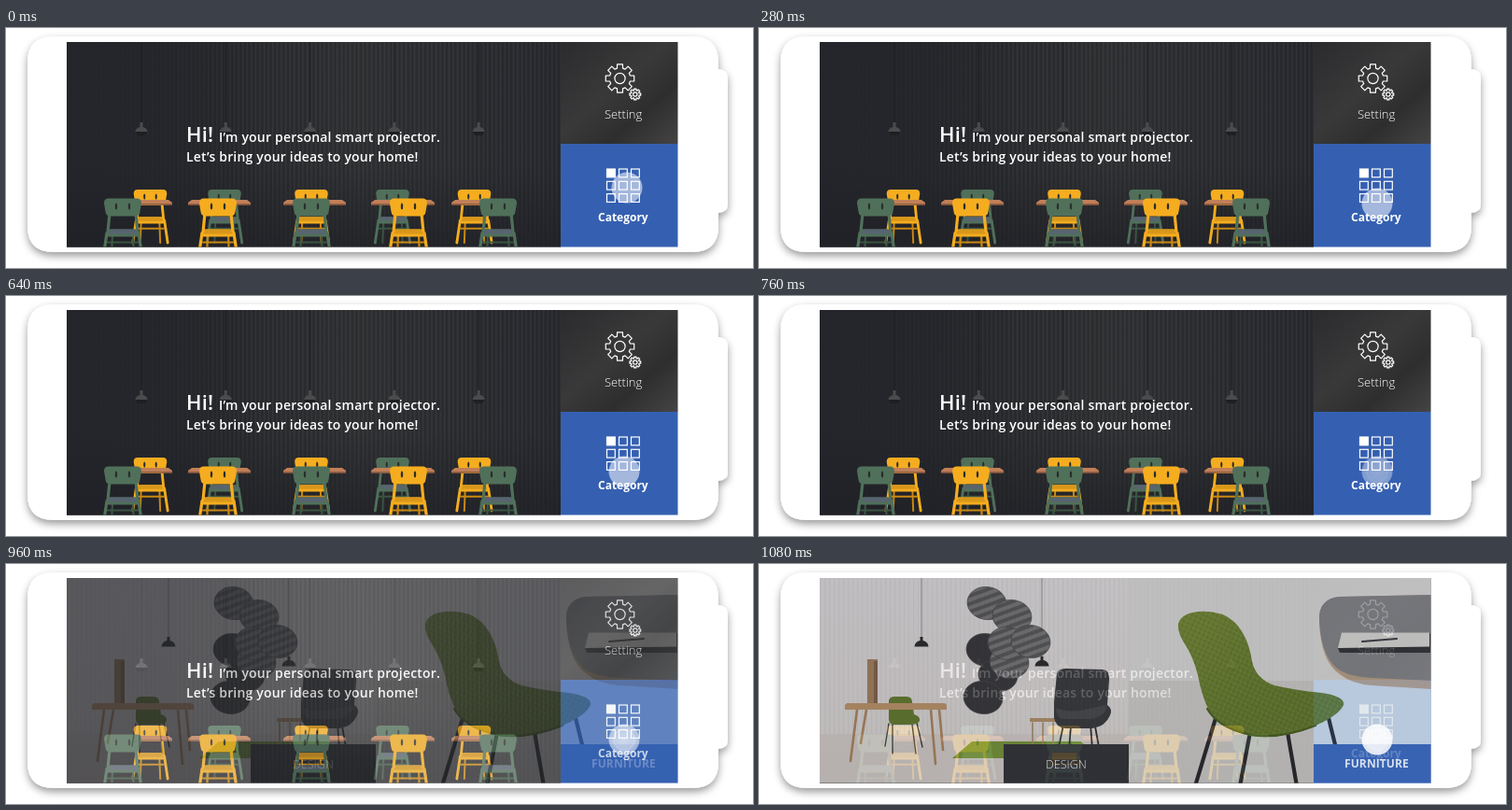
An HTML page that plays this animation: 800x257 px, repeating every 1.12 s.

```html
<!DOCTYPE html>
<html lang="en">
<head>
<meta charset="utf-8">
<title>Smart projector</title>
<style>
  html, body { margin: 0; width: 100%; height: 100%; overflow: hidden; background: #fff; }
  svg { display: block; width: 800px; height: 257px; }
  text { font-family: "Open Sans", "Noto Sans", sans-serif; fill: #fff; }
  .line { fill: none; stroke: #fff; stroke-width: 1.2; stroke-linejoin: round; }
</style>
</head>
<body>
<svg viewBox="0 0 800 257" xmlns="http://www.w3.org/2000/svg">
  <defs>
    <filter id="shadow" x="-5%" y="-10%" width="110%" height="125%">
      <feDropShadow dx="0" dy="4" stdDeviation="4.5" flood-color="#000" flood-opacity=".4"/>
    </filter>
    <clipPath id="screen"><rect x="65" y="15" width="654.5" height="219.5"/></clipPath>
    <linearGradient id="wall">
      <stop offset="0" stop-color="#25262b"/>
      <stop offset=".28" stop-color="#292a2d"/>
      <stop offset=".6" stop-color="#313234"/>
      <stop offset="1" stop-color="#282a2f"/>
    </linearGradient>
    <linearGradient id="shade" x2="0" y2="1">
      <stop offset="0" stop-color="#202126" stop-opacity=".1"/>
      <stop offset=".6" stop-color="#202126" stop-opacity=".1"/>
      <stop offset="1" stop-color="#202126" stop-opacity=".8"/>
    </linearGradient>
    <linearGradient id="leftShade">
      <stop offset="0" stop-color="#25262b"/>
      <stop offset=".2" stop-color="#25262b" stop-opacity=".75"/>
      <stop offset=".4" stop-color="#25262b" stop-opacity="0"/>
    </linearGradient>
    <linearGradient id="setting" x2="1" y2="1">
      <stop offset="0" stop-color="#2b2b2d"/>
      <stop offset=".45" stop-color="#39393a"/>
      <stop offset=".7" stop-color="#2e2e2f"/>
      <stop offset="1" stop-color="#444445"/>
    </linearGradient>
    <linearGradient id="pale" x2="0" y2="1">
      <stop offset="0" stop-color="#e8e5e7"/>
      <stop offset="1" stop-color="#e4dfdd"/>
    </linearGradient>
    <linearGradient id="felt" x2="1" y2="1">
      <stop offset="0" stop-color="#778d35"/>
      <stop offset=".55" stop-color="#677f2c"/>
      <stop offset="1" stop-color="#647b2b"/>
    </linearGradient>
    <radialGradient id="glow">
      <stop offset="0" stop-color="#fff" stop-opacity=".5"/>
      <stop offset=".65" stop-color="#fff" stop-opacity=".34"/>
      <stop offset="1" stop-color="#fff" stop-opacity=".16"/>
    </radialGradient>
    <pattern id="slats" width="4.6" height="8" patternUnits="userSpaceOnUse">
      <rect width="1.2" height="8" fill="#fff" opacity=".05"/>
      <rect x="2.2" width="1.4" height="8" fill="#000" opacity=".1"/>
    </pattern>
    <pattern id="paleSlats" width="5" height="8" patternUnits="userSpaceOnUse">
      <rect width="1.2" height="8" fill="#777" opacity=".07"/>
    </pattern>
    <pattern id="stripes" width="8" height="8" patternUnits="userSpaceOnUse" patternTransform="rotate(62)">
      <rect width="8" height="8" fill="#78787b"/>
      <rect width="4" height="8" fill="#58585b"/>
    </pattern>
    <pattern id="speckle" width="5" height="5" patternUnits="userSpaceOnUse" patternTransform="rotate(25)">
      <rect width="1.3" height="1.3" fill="#8fa05f" opacity=".5"/>
      <rect x="2.6" y="2.4" width="1.4" height="1.4" fill="#46571f" opacity=".5"/>
    </pattern>
  </defs>

  <path filter="url(#shadow)" fill="#fff" d="M51 9H735Q763 9 763 37V44Q773 45 773 53V189Q773 197 763 198V212Q763 240 735 240H51Q23 240 23 212V37Q23 9 51 9Z"/>
  <g clip-path="url(#screen)">
    <g id="home"></g>
    <g id="rooms" opacity="0"></g>
    <g id="pointer">
      <circle id="flat" r="16.5" fill="#fff"/>
      <g id="ripple">
        <circle r="16.5" fill="url(#glow)"/>
        <circle r="11" fill="none" stroke="#fff" stroke-width=".8" opacity=".35"/>
      </g>
      <circle id="solid" r="16.5" fill="#fff"/>
    </g>
  </g>
</svg>
<script>
const $ = id => document.getElementById(id);
const YELLOW = ['#f5ad1f', '#c98812', '#d9971a'];
const GREEN = ['#50705a', '#3a5543', '#586470'];

const rect = (x, y, w, h, fill, more = '') =>
  `<rect x="${x}" y="${y}" width="${w}" height="${h}" fill="${fill}" ${more}/>`;
const path = (d, fill, more = '') => `<path d="${d}" fill="${fill}" ${more}/>`;
const stroke = (d, color, width) =>
  path(d, 'none', `stroke="${color}" stroke-width="${width}" stroke-linecap="round"`);
const label = (x, y, size, weight, words, gap = 0) =>
  `<text x="${x}" y="${y}" font-size="${size}" font-weight="${weight}" letter-spacing="${gap}">${words}</text>`;

function chair(x, y, scale, [main, dark, pad]) {
  return `<g transform="translate(${x} ${y}) scale(${scale})">` +
    stroke('M-11 38L-12 64M11 38L12 64M-16 47H16', dark, 2.2) +
    stroke('M-14 16L-16 36M14 16L16 36M-17 37L-21 64M17 37L21 64', main, 3.2) +
    path('M-14 33H14L18 38Q18 41 15 41H-15Q-18 41 -18 38Z', main) +
    path('M-13 33H13L16 38H-16Z', pad) +
    path('M-15 0H15Q20 0 20 5L18.5 14Q18 19 13 19H-13Q-18 19 -18.5 14L-20 5Q-20 0 -15 0Z', main) +
    [-7, 7].map(cx => `<ellipse cx="${cx}" cy="8.5" rx="1.2" ry="3.5" fill="#2b2d2c"/>`).join('') +
    '</g>';
}

function gear(cx, cy, r, hole) {
  const points = [];
  for (let i = 0; i < 8; i++) {
    [[-.27, .73], [-.19, 1], [.19, 1], [.27, .73]].forEach(([turn, k]) => {
      const a = i * Math.PI / 4 + turn;
      points.push((cx + r * k * Math.cos(a)).toFixed(2) + ',' + (cy + r * k * Math.sin(a)).toFixed(2));
    });
  }
  return `<polygon class="line" points="${points.join(' ')}"/>` +
    `<circle class="line" cx="${cx}" cy="${cy}" r="${hole}"/>`;
}

function hangingLamp(x, y) {
  return stroke(`M${x} 15V${y}`, '#77777a', .7) +
    path(`M${x - 1.5} ${y - 2}H${x + 1.5}V${y + 2}Q${x + 7} ${y + 3} ${x + 7.5} ${y + 8.5}H${x - 7.5}Q${x - 7} ${y + 3} ${x - 1.5} ${y + 2}Z`, '#2a2a2c');
}

function cafe() {
  let out = rect(65, 15, 529, 220, 'url(#wall)') + rect(65, 15, 529, 220, 'url(#slats)') +
    rect(65, 15, 529, 220, 'url(#leftShade)') + rect(65, 15, 529, 220, 'url(#shade)');
  for (let i = 0; i < 5; i++) {
    const x = 145 + i * 90.3;
    out += stroke(`M${x} 15V102`, '#1c1d20', .8) +
      path(`M${x - 1.5} 101H${x + 1.5}V106Q${x + 6} 107 ${x + 6.5} 111H${x - 6.5}Q${x - 6} 107 ${x - 1.5} 106Z`, '#4a4b4d') +
      path(`M${x - 6} 111H${x + 6}L${x + 4} 115H${x - 4}Z`, '#1e1f22');
  }
  // back chair, front chair, table left and right
  [[154.5, 125, 111, 178], [234, 227, 195, 262], [327, 327, 297, 364],
   [414, 431, 391, 459], [501.5, 527, 477, 543]].forEach(([back, front, left, right], i) => {
    out += chair(back, 173, .89, i % 2 ? GREEN : YELLOW) +
      path(`M${left + 4} 184H${right - 4}L${right} 187V189.5H${left}V187Z`, '#c17f58') +
      rect(left, 188.3, right - left, 1.2, '#80503a') +
      chair(front, 182.5, 1, i % 2 ? YELLOW : GREEN);
  });
  return out;
}

function home() {
  let out = cafe() + rect(594, 15, 126, 109, 'url(#setting)') + rect(594, 124, 126, 111, '#3560b1') +
    gear(657.5, 54, 15.5, 5.6) + gear(673.8, 71, 6, 2.2);
  for (let i = 0; i < 9; i++) {
    out += rect(643.5 + i % 3 * 13, 151 + Math.floor(i / 3) * 13.3, 8.8, 8.8, i ? 'none' : '#fff', 'stroke="#fff" stroke-width="1.2"');
  }
  return out + label(193, 122, 22, 600, 'Hi!', .2) +
    label(228, 121.5, 14, 600, 'I’m your personal smart projector.', .2) +
    label(193, 143, 14, 600, 'Let’s bring your ideas to your home!', .18) +
    label(641, 96.5, 13, 300, 'Setting') + label(634, 207, 12, 700, 'Category');
}

const panel = (cx, cy, fill) =>
  `<ellipse cx="${cx}" cy="${cy}" rx="21" ry="17.5" transform="rotate(8 ${cx} ${cy})" fill="${fill}" stroke="#4a4a4d" stroke-width=".7"/>`;

function designRoom() {
  return rect(65, 15, 331, 220, 'url(#pale)') + rect(65, 15, 331, 167, 'url(#paleSlats)') +
    rect(65, 182, 331, 53, '#dcd5d1') +
    path('M228 190H345L360 208H207Z', '#7b9a3a') +
    hangingLamp(174, 80) + hangingLamp(303, 101) +
    [[243, 92], [256, 119], [240, 143]].map(p => panel(...p, '#38383b')).join('') +
    [[244, 42], [271, 56], [268, 105], [266, 85], [291, 83]].map(p => panel(...p, 'url(#stripes)')).join('') +
    rect(116, 102, 11, 48, '#a98663') + rect(123, 104, 4, 46, '#86684c') +
    // small green chair
    stroke('M139 171L135 195M143 172V203M164 172L168 203M169 170L175 196', '#3a3a3c', 1.4) +
    path('M139 146Q140 142 145 142H158Q164 142 164 148L166 161Q173 163 172 168Q170 172 160 172H143Q138 170 139 163Z', '#66802f') +
    // desk
    stroke('M105 156L98 211M115 156L109 192M184 156L189 214M193 156L197 199', '#b38a61', 2.6) +
    path('M94 149H199L201 151V156H92V151Z', '#c59a6e') +
    // side table and armchair
    stroke('M293 170V204M304 170V207M315 170V204', '#b08f6c', 1.6) +
    path('M290 165H318V169H290Z', '#b8946d') +
    stroke('M326 172L319 206M334 174L332 198M360 174L366 207M355 172L357 198', '#2c2c2f', 1.8) +
    path('M319 117Q321 112 330 112L368 113Q376 114 375 124L373 151Q379 155 376 162Q371 174 357 176H328Q318 175 316 165V148Z', '#38393d') +
    path('M318 154Q332 160 349 156L372 151Q374 161 356 166H325Q318 164 318 154Z', '#48494d') +
    rect(262, 193, 134, 42, '#333439') + label(307, 219, 12.5, 300, 'DESIGN');
}

function furnitureRoom() {
  const shell = 'M449 64Q452 53 470 51Q495 49 509 62Q524 77 528 104Q532 123 552 130Q573 135 603 138Q628 142 626 151Q621 162 596 173Q558 189 527 184Q493 176 482 157Q474 141 470 119Q465 99 455 84Q448 73 449 64Z';
  return rect(396, 15, 324, 220, '#e3e1e1') + rect(396, 125, 198, 110, '#d8d5d3') +
    rect(594, 124, 126, 69, '#dae3e9') +
    // tabletop with notebook and pen
    path('M720 33L622 35Q599 37 600 60Q601 104 622 118Q634 128 656 130L720 134Z', '#bda68b') +
    path('M720 33L622 35Q599 37 600 60Q602 103 624 115Q636 121 658 122L720 125Z', '#85868b') +
    path('M620 90L622 95H719V74Z', '#303136') +
    path('M624 73.5H718V88.5L620 90Z', '#e0e0df') +
    stroke('M646 83L683 80', '#3a3b42', 2) +
    // large chair
    stroke('M490 162L467 238M526 180L515 238M566 180L576 238M610 165L628 238', '#28292c', 4.2) +
    path(shell, 'url(#felt)') + path(shell, 'url(#speckle)') +
    stroke('M480 155Q492 176 527 183Q558 188 596 173', '#4a6220', 2.2) +
    rect(594, 193, 126, 42, '#3a65b3') + label(627, 218, 12, 700, 'FURNITURE', .1);
}

$('home').innerHTML = home();
$('rooms').innerHTML = designRoom() + furnitureRoom();

const LOOP = 1120, STEP = 40;
const ramp = (t, from, to) => Math.min(1, Math.max(0, (t - from) / (to - from)));

function draw(time) {
  const t = Math.floor(time % LOOP / STEP) * STEP;
  const move = 1 - (1 - ramp(t, 0, 160)) ** 2;
  const press = ramp(t, 700, 840);
  $('pointer').setAttribute('transform', `translate(${665 - 3 * move} ${171 + 17 * move})`);
  $('flat').setAttribute('opacity', .55 * (1 - press));
  $('ripple').setAttribute('opacity', press);
  $('solid').setAttribute('opacity', .8 * ramp(t, 860, 1060));
  $('rooms').setAttribute('opacity', ramp(t, 900, 1125));
}

const start = performance.now();
function tick() {
  draw(performance.now() - start);
  requestAnimationFrame(tick);
}
tick();
</script>
</body>
</html>
```
